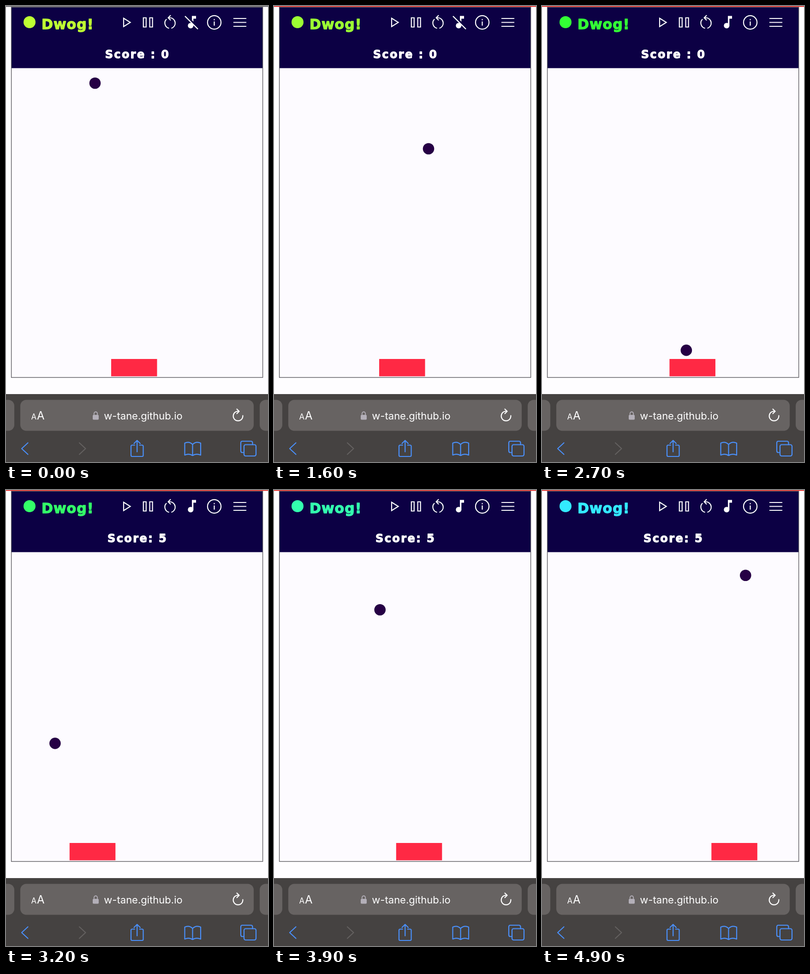
An HTML page that plays this animation: 568x987 px, repeating every 5 s.

```html
<!DOCTYPE html>
<html lang="en">
<head>
<meta charset="utf-8">
<title>Paddle game</title>
<style>
  html, body { margin: 0; width: 100%; height: 100%; overflow: hidden; background: #fff; }
  svg { display: block; width: 100%; height: 100%; }
  .line { fill: none; stroke: #fff; stroke-width: 2.2; }
  .blue { fill: none; stroke: #4a90fb; stroke-width: 2.2; stroke-linejoin: round; stroke-linecap: round; }
  .game { font-family: "DejaVu Sans", sans-serif; font-weight: 700; stroke-width: 1.3; stroke-linejoin: round; }
  .ui { font-family: Inter, sans-serif; fill: #fff; }
  #score { font-size: 24px; letter-spacing: 2.4px; fill: #fff; stroke: #fff; }
  #brand .game { font-size: 30px; letter-spacing: 1px; fill: currentColor; stroke: currentColor; }
</style>
</head>
<body>
<svg viewBox="0 0 568 987">
  <rect width="568" height="987" fill="#fefdff"/>
  <rect x="11.5" y="2.5" width="545" height="801.5" fill="#fdfbff"/>
  <circle id="ball" r="12.3" fill="#260045"/>
  <rect id="paddle" y="764" width="99.5" height="37.5" fill="#ff2944"/>

  <rect x="12" y="3" width="544" height="131.5" fill="#0c0044"/>
  <rect x="11.6" y="2.5" width="545" height="801.5" fill="none" stroke="#5c5a60" stroke-width="1.4"/>
  <rect id="strip" width="568" height="1.8"/>

  <g id="brand">
    <circle cx="51" cy="35" r="13" fill="currentColor"/>
    <text class="game" x="77" y="50">Dwog!</text>
  </g>
  <text id="score" class="game" x="285" y="113" text-anchor="middle"></text>

  <g class="line">
    <path d="M255 26.5V44.5L269.5 35.5Z"/>
    <path d="M297.8 25.5h6v20h-6zM311.6 25.5h6v20h-6z"/>
    <path d="M348 28.5A11.6 11.6 0 0 0 353.5 48.2M358.5 48.2A11.6 11.6 0 0 0 356 25.5H352M357 20l-5.3 5.5 5.3 5.5"/>
    <circle cx="451.5" cy="35.5" r="14.6"/>
    <path d="M451.5 33.5V42.5M451.5 28.3V30.8"/>
    <path d="M493 27H521M493 35.5H521M493 44H521"/>
  </g>
  <g fill="#fff">
    <circle cx="400.3" cy="42.6" r="6"/>
    <path d="M403 21.5H412V27.5H406.3V42.6H403Z"/>
  </g>
  <g id="mute" fill="none">
    <path d="M390 20.5L418 48.5" stroke="#0c0044" stroke-width="4"/>
    <path d="M388 22L416 50" stroke="#fff" stroke-width="2.4"/>
  </g>

  <rect y="840" width="568" height="147" fill="#454241"/>
  <g fill="#676362">
    <rect x="-30" y="852.5" width="48" height="67" rx="13"/>
    <rect x="31" y="852.5" width="506" height="67" rx="13"/>
    <rect x="550" y="852.5" width="48" height="67" rx="13"/>
  </g>
  <g class="ui">
    <text x="54.5" y="895" font-size="17">A</text>
    <text x="67" y="895" font-size="24">A</text>
    <text x="297.5" y="894.5" font-size="22" text-anchor="middle">w-tane.github.io</text>
  </g>
  <rect x="188" y="885" width="13" height="10.5" rx="2" fill="#b3afb8"/>
  <path d="M190.8 886V882.5a3.7 4 0 0 1 7.4 0V886" fill="none" stroke="#b3afb8" stroke-width="1.8"/>
  <path class="line" stroke-linecap="round" stroke-linejoin="round"
    d="M513.4 886.5A10.4 10.4 0 1 1 504.5 877.2M500.5 872.5l5 4.8-5 5"/>

  <path class="blue" stroke-width="3" d="M47.5 945.5L34 958L47.5 970.5"/>
  <path class="blue" style="stroke:#646160" d="M159 945.5L172.5 958L159 970.5"/>
  <path class="blue" d="M279 950.5H273.500Q271 950.500 271 953V972.500Q271 975 273.500 975H295Q297.500 975 297.500 972.500V953Q297.500 950.500 295 950.500H289.500M284.200 965V940.500M277.500 947L284.200 940.300L291 947"/>
  <path class="blue" d="M404.500 949Q397 941.500 387.500 946V972Q397 968 404.500 973Q412 968 422 972V946Q412 941.500 404.500 949V973"/>
  <g class="blue">
    <path d="M516 966.500H512.500Q509 966.500 509 963V945.500Q509 942 512.500 942H531Q534.500 942 534.500 945.500V949.500"/>
    <rect x="516" y="949.500" width="26" height="24.500" rx="3.500"/>
  </g>
</svg>
<script>
  const LOOP = 5000, STEP = 100;
  const SPEED = 0.413;          // px per ms along each axis
  const PAUSE_AT = 142;         // distance covered before the pause
  const RESUME = 1644;
  const HIT = 2711;
  const paddleKeys = [[0, 228], [RESUME, 228], [2300, 387.3], [3200, 137.8], [3900, 264.8], [4900, 367.3]];
  const $ = id => document.getElementById(id);
  const ball = $("ball"), paddle = $("paddle"), brand = $("brand");
  const score = $("score"), mute = $("mute"), strip = $("strip");

  function bounce(v, lo, hi) {
    const span = hi - lo, u = (v - lo) % (2 * span);
    return lo + (u > span ? 2 * span - u : u);
  }

  function along(keys, t) {
    const i = Math.max(1, keys.findIndex(k => k[0] >= t));
    const [t0, a] = keys[i - 1], [t1, b] = keys[i];
    return a + (b - a) * (t - t0) / (t1 - t0);
  }

  function travelled(t) {
    return t < RESUME ? Math.min(PAUSE_AT, SPEED * t) : PAUSE_AT + SPEED * (t - RESUME);
  }

  function draw(t) {
    const d = travelled(t);
    ball.setAttribute("cx", bounce(193 + d, 23.5, 542));
    ball.setAttribute("cy", bounce(167 + d, 15.5, 750));
    paddle.setAttribute("x", along(paddleKeys, t));
    brand.style.color = `hsl(${79 + d * 0.072} 100% 60%)`;
    score.textContent = t < HIT ? "Score : 0" : "Score: 5";
    mute.style.display = t < RESUME ? "" : "none";
    strip.setAttribute("fill", t < STEP ? "#69676b" : "#e5322f");
  }

  const start = performance.now();
  function tick() {
    const t = Math.max(0, performance.now() - start) % LOOP;
    draw(Math.floor(t / STEP) * STEP);
    requestAnimationFrame(tick);
  }
  tick();
</script>
</body>
</html>
```
